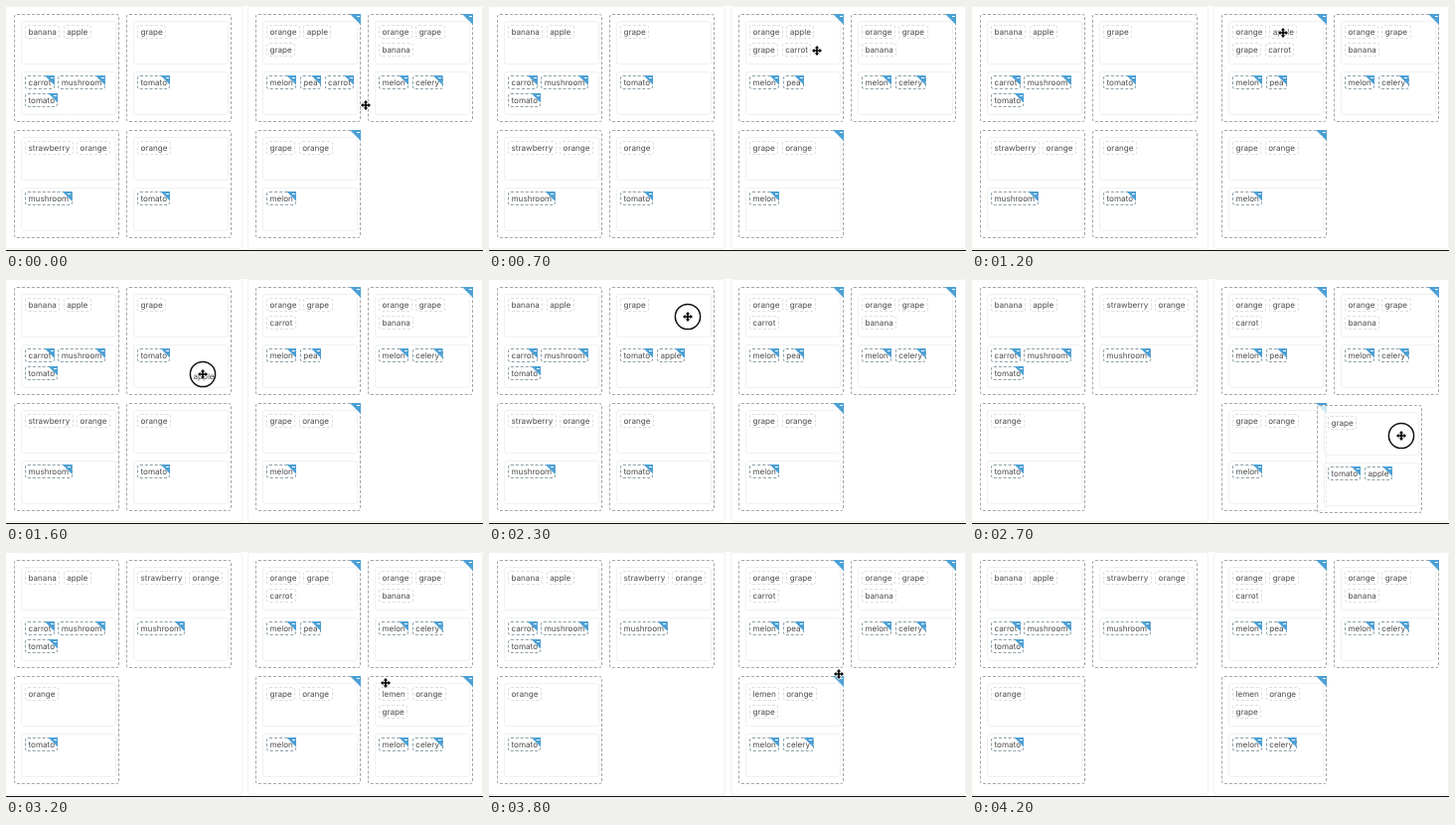
These frames come from a looping animation (480x247 px, 4500 ms). An HTML page:

```html
<!DOCTYPE html>
<html lang="en">
<head>
<meta charset="utf-8">
<title>Drag and drop lists</title>
<style>
  * { box-sizing: border-box; }
  html, body { margin: 0; width: 100%; height: 100%; overflow: hidden; background: #fff; }
  #stage {
    position: relative; width: 480px; height: 247px; overflow: hidden;
    font: 8.1px/12px Inter, Roboto, sans-serif; color: #4d4d4d;
    text-rendering: geometricPrecision;
  }
  .panel { position: absolute; top: 0; height: 245px; border: 1px solid #f1f1f1; border-radius: 3px; }
  .base { position: absolute; left: 0; top: 246px; width: 480px; height: 1px; background: #111; }
  .card {
    position: absolute; width: 106px; height: 109px;
    border: 1px dashed #a6a6a6; border-radius: 3px;
  }
  .area {
    position: absolute; left: 6px; width: 96px; height: 44px; padding: 3px 0 0 3px;
    border: 1px solid #f1f1f1; border-radius: 3px;
    display: flex; flex-wrap: wrap; align-content: flex-start; gap: 4px 3.4px;
  }
  .fruit { top: 6px; }
  .veg { top: 57px; }
  .pill {
    position: relative; height: 14px; padding: 0 2.5px;
    border: 1px dashed #dedede; border-radius: 3px; white-space: nowrap;
  }
  .veg .pill { border-color: #8b9fa8; }
  .veg .pill::after, .fold::after {
    content: ""; position: absolute; top: -1px; right: -1px; width: 10px; height: 10px;
    background: linear-gradient(#fff, #fff) 82% 22% / 3px 1px no-repeat, #4ca0d5;
    clip-path: polygon(0 0, 100% 0, 100% 100%);
  }
  .fold::after { width: 11px; height: 11px; }
  #drag { position: absolute; left: 0; top: 0; }
  #drag > .card { background: rgba(255, 255, 255, .75); }
  #drag > .pill {
    position: absolute; left: 1px; top: 2px;
    transform: translate(-50%, -50%); border-color: transparent;
  }
  #cursor { position: absolute; left: -15px; top: -15px; }
</style>
</head>
<body>
<div id="stage">
  <div class="panel" style="left:-3px;width:241px"></div>
  <div class="panel" style="left:243px;width:237px"></div>
  <div class="base"></div>
  <div id="cards"></div>
  <div id="drag"></div>
  <svg id="cursor" width="30" height="30" viewBox="-15 -15 30 30">
    <circle id="ring" r="12.6" fill="none" stroke="#111" stroke-width="1.5"/>
    <path d="M0-5L2.2-2.5H.8V-.8H2.5V-2.2L5 0L2.5 2.2V.8H.8V2.5H2.2L0 5L-2.2 2.5H-.8V.8H-2.5V2.2L-5 0L-2.5-2.2V-.8H-.8V-2.5H-2.2Z"
      fill="#000" stroke="#fff" stroke-width="1.4" paint-order="stroke"/>
  </svg>
</div>
<script>
const LOOP = 4500, STEP = 100, LAST = 42;
const $ = id => document.getElementById(id);

// Cards are written "fruits|vegetables"; an empty string is a vacant slot.
const first = "banana apple|carrot mushroom tomato";
const berry = "strawberry orange|mushroom";
const plain = "orange|tomato";
const grape = "grape|tomato";
const moved = "grape|tomato apple";
const second = "orange grape banana|melon celery";
const third = "grape orange|melon";
const fresh = "lemen orange grape|melon celery";
const tidy = "orange grape carrot|melon pea";

const start = [first, grape, berry, plain];
const reflowed = [first, berry, plain];

// [step, left cards, right cards, dragged thing]
const scenes = [
  [0, start, ["orange apple grape|melon pea carrot", second, third]],
  [4, start, ["orange apple grape|melon pea", second, third], "carrot"],
  [6, start, ["orange apple grape carrot|melon pea", second, third]],
  [14, start, [tidy, second, third], "apple"],
  [18, [first, moved, berry, plain], [tidy, second, third]],
  [24, [first, "", berry, plain], [tidy, second, third], moved],
  [25, reflowed, [tidy, second, third], moved],
  [30, reflowed, [tidy, second, third, fresh]],
  [37, reflowed, [tidy, second, fresh]]
];

// [step, x, y]
const path = [
  [0, 362, 100], [1, 351, 87], [3, 337, 77], [6, 330, 45], [8, 330, 45],
  [12, 313, 27], [13, 313, 27], [16, 198, 96], [20, 198, 96], [23, 200, 38],
  [24, 283, 59], [25, 336, 96], [26, 390, 133], [27, 432, 158], [28, 450, 165],
  [29, 455, 165], [30, 457, 158], [31, 425, 146], [32, 382, 132], [34, 352, 130],
  [37, 352, 130], [39, 352, 116]
];
const presses = [[3, 5], [13, 17], [23, 29]];
const hideAt = 40;

const pill = word => `<div class="pill">${word}</div>`;
const area = (kind, words) =>
  `<div class="area ${kind}">${words.split(" ").map(pill).join("")}</div>`;

function card(text, x, y, fold) {
  if (!text) return "";
  const [fruit, veg] = text.split("|");
  return `<div class="card ${fold ? "fold" : ""}" style="left:${x}px;top:${y}px">` +
    area("fruit", fruit) + area("veg", veg) + "</div>";
}

const panel = (list, x, fold) =>
  list.map((text, i) => card(text, x + i % 2 * 113, 8 + (i >> 1) * 117, fold)).join("");

function pointAt(step) {
  const i = path.findIndex(p => p[0] > step);
  if (i < 0) return path[path.length - 1].slice(1);
  const [s0, x0, y0] = path[i - 1], [s1, x1, y1] = path[i];
  const k = (step - s0) / (s1 - s0);
  return [x0 + (x1 - x0) * k, y0 + (y1 - y0) * k];
}

let shown;
function draw(step) {
  const scene = scenes.filter(s => s[0] <= step).pop();
  if (scene !== shown) {
    const [, left, right, held] = shown = scene;
    $("cards").innerHTML = panel(left, 8, false) + panel(right, 251, true);
    $("drag").innerHTML = !held ? "" : held.includes("|") ? card(held, -85, -31) : pill(held);
  }
  const [x, y] = pointAt(step);
  $("drag").style.transform = `translate(${x}px, ${y}px)`;
  $("cursor").style.transform = `translate(${x}px, ${y}px)`;
  $("cursor").style.visibility = step < hideAt ? "visible" : "hidden";
  $("ring").style.display = presses.some(([a, b]) => step >= a && step <= b) ? "" : "none";
}

const began = performance.now();
function tick() {
  const time = (performance.now() - began) % LOOP;
  draw(Math.min(LAST, Math.floor(time / STEP)));
  requestAnimationFrame(tick);
}
tick();
</script>
</body>
</html>
```
